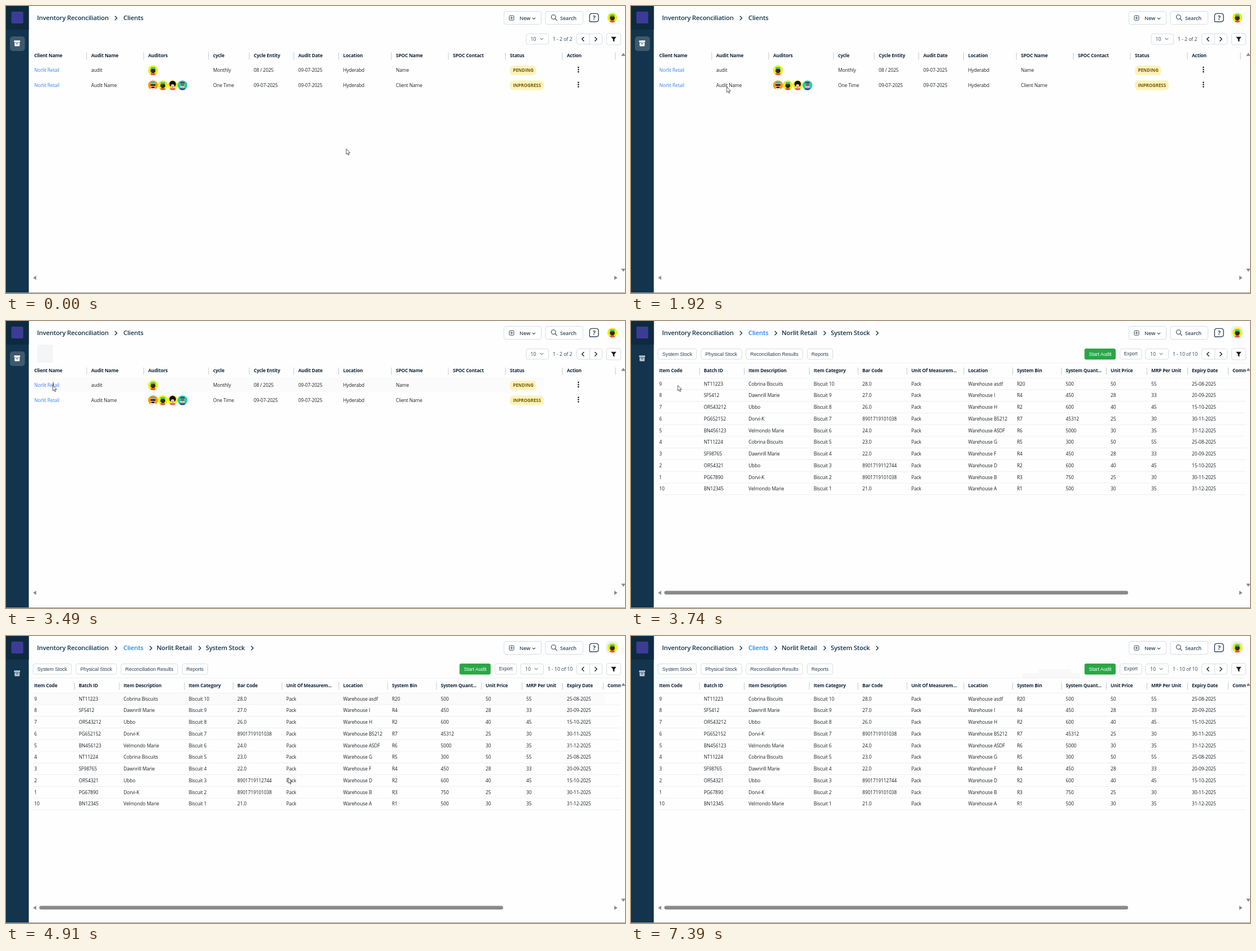
Animation of 1097x510 px, one loop 7570 ms. Source, as an HTML page:

```html
<!DOCTYPE html>
<html lang="en">
<head>
<meta charset="utf-8">
<title>Inventory Reconciliation</title>
<style>
  html, body { margin: 0; width: 100%; height: 100%; overflow: hidden; background: #fefefe; }
  svg { display: block; width: 100vw; height: 100vh; }
  text { font: 400 8.4px "Open Sans", "Noto Sans", sans-serif; letter-spacing: -.1px; fill: #1d2126; white-space: pre; }
  .head { font-weight: 700; font-size: 8.4px; letter-spacing: -.17px; fill: #12263a; }
  .crumb { font-weight: 600; font-size: 11.2px; letter-spacing: -.17px; fill: #12344d; }
  .tool { font-weight: 600; font-size: 9.1px; letter-spacing: -.12px; fill: #33475b; }
  .page { font-size: 8.8px; fill: #33475b; }
  .badge { font-weight: 700; font-size: 7.9px; letter-spacing: 0; fill: #735a0c; }
  .btn { font: 400 8.66px "Liberation Sans", Arial, sans-serif; letter-spacing: 0; fill: #2b3f52; }
  .blue { fill: #2186eb; }
  .link { fill: #3b82f6; }
</style>
</head>
<body>
<svg id="stage" viewBox="0 0 1097 510" xmlns="http://www.w3.org/2000/svg"></svg>
<script>
const LOOP = 7570;
const PARTNER = 'Norlit Retail';

const text = (x, y, s, cls = '', extra = '') => `<text x="${x}" y="${y}" class="${cls}" ${extra}>${s}</text>`;
const rect = (x, y, w, h, fill, r = 0, extra = '') =>
  `<rect x="${x}" y="${y}" width="${w}" height="${h}" rx="${r}" fill="${fill}" ${extra}/>`;
const path = (d, stroke, width = 1, fill = 'none') =>
  `<path d="${d}" fill="${fill}" stroke="${stroke}" stroke-width="${width}" stroke-linecap="round" stroke-linejoin="round"/>`;
const dot = (x, y, r, fill) => `<circle cx="${x}" cy="${y}" r="${r}" fill="${fill}"/>`;
const box = (x1, x2, y1 = 49.5, y2 = 68) => rect(x1, y1, x2 - x1, y2 - y1, '#fff', 3, 'stroke="#d3dae0" stroke-width=".9"');
const right = (x, y, s = 2.4, c = '#12344d', w = 1.4) => path(`M${x - s / 2} ${y - s * 1.4}l${s * 1.4} ${s * 1.4}l${-s * 1.4} ${s * 1.4}`, c, w);
const down = (x, y, s = 2.6, c = '#33475b', w = 1) => path(`M${x - s} ${y - s / 2}l${s} ${s}l${s} ${-s}`, c, w);
const separators = xs => path(xs.map(x => `M${x} 83v12`).join(''), '#c3c9d1', 1);

function avatar(x, y, kind) {
  const bg = { lime: '#e3f300', orange: '#ff980f', yellow: '#fff000', teal: '#1fd0b2' }[kind];
  const parts = {
    lime: rect(-4.4, 5, 8.8, 4, '#e8543f', 2) + dot(0, .6, 4.4, '#432519') +
      rect(-4, -5.6, 8, 3.4, '#38b9ad', 1.7) + rect(-1.8, 2.4, 3.6, .9, '#21110c', .4),
    orange: rect(-5, 5, 10, 4, '#eee', 2) + rect(-3.8, -4.5, 7.6, 10, '#e9c59c', 3.5) +
      rect(-4, -6.3, 8, 3.4, '#44b5a6', 1.5) + rect(-4.4, -2, 8.8, 2.8, '#171717', 1.2) +
      rect(-3, 2.4, 6, 2.6, '#302018', 1.2),
    yellow: rect(-4.8, 5, 9.6, 4, '#ee526d', 2) + dot(0, -2.3, 5.8, '#120d0b') +
      rect(-3, -1.8, 6, 7.2, '#f5caa4', 2.8) + rect(-1.5, 2.7, 3, .8, '#c43d3d', .4),
    teal: rect(-5, 5, 10, 4, '#37517b', 2) + rect(-3.7, -4, 7.4, 9, '#f4d3b5', 3.3) +
      rect(-4.2, -6.2, 8.4, 3.7, '#4b505a', 1.8) + rect(-3.5, -1.5, 7, 2.1, '#273645', .9) +
      rect(-1.6, 2.7, 3.2, .8, '#b45a48', .4)
  };
  return `<g transform="translate(${x} ${y})">${dot(0, 0, 8.7, bg)}<g clip-path="url(#face)">${parts[kind]}</g></g>`;
}

function frame() {
  const arrow = (x, y, d) => path(`M${x} ${y}${d}z`, 'none', 0, '#8a8a8a');
  return rect(0, 0, 40.4, 510, '#12344d') + rect(0, 0, 40.4, 42, '#0e2a3e') +
    rect(9.5, 10, 21, 21, '#3c3c98', 2) +
    text(55, 25, 'Inventory Reconciliation', 'crumb') + right(194.5, 21.5) +
    box(882.5, 948.5, 9.5, 32.5) + rect(892, 17.2, 8, 8, 'none', 1.2, 'stroke="#33475b"') +
    path('M894 21.2h4M896 19.2v4', '#33475b', 1) +
    text(910, 24.6, 'New', 'tool') + down(935.5, 22.2, 2.3, '#33475b', 1.1) +
    box(956, 1022.5, 9.5, 32.5) +
    '<circle cx="970.3" cy="19.6" r="3.9" fill="none" stroke="#33475b" stroke-width="1.1"/>' +
    path('M973.3 22.6l3 3.2', '#33475b', 1.1) + text(982, 24.6, 'Search', 'tool') +
    path('M1038.5 13.4h7.3q4.2 0 4.2 4.2v6.2q0 4.2-4.2 4.2h-10.5q-1 0-1-1v-9.4q0-4.2 4.2-4.2z', '#33475b', 1.4) +
    text(1042.2, 24.7, '?', 'tool', 'text-anchor="middle" style="font-size:11px;font-weight:700"') +
    box(1011.5, 1056.5) + path('M1034.5 49.5v18.5', '#d3dae0', .9) +
    path('M1024 55.4l-3.3 3.4l3.3 3.4', '#12263a', 1.4) + right(1045, 58.8, 2.4, '#12263a') +
    box(1064.5, 1089.5, 48.5, 69) +
    path('M1073 55.2h8l-3.1 3.8v4l-1.8-1.2v-2.8z', '#111', .8, '#111') +
    arrow(48, 483, 'l5.5-3.8v7.6') + arrow(1083.5, 483, 'l-5.5-3.8v7.6') +
    arrow(1094, 83.3, 'l3.8 5.4h-7.6') + arrow(1094, 472.2, 'l3.8-5.4h-7.6') +
    rect(0, 509, 1097, 1, '#8997a1');
}

const archive = c => rect(14.3, 61.2, 10.8, 3.2, c, .7) +
  path('M15.2 65.3h9v5.2q0 1-1 1h-7q-1 0-1-1z', 'none', 0, c) + rect(18, 66.6, 3.4, 1.2, '#2b485d', .5);

function clientsPage() {
  const cols = [50, 151, 252, 367, 439, 518, 597.5, 691, 792, 893, 994];
  const heads = 'Client Name|Audit Name|Auditors|cycle|Cycle Entity|Audit Date|Location|SPOC Name|SPOC Contact|Status|Action'.split('|');
  const rows = [
    'audit||Monthly|08 / 2025|09-07-2025|Hyderabd|Name',
    'Audit Name||One Time|09-07-2025|09-07-2025|Hyderabd|Client Name'
  ];
  const badge = (y, w, s) => rect(893, y - 8.3, w, 17, '#fdf3ba', 6) + text(898.5, y + 3.1, s, 'badge');
  return rect(7, 54, 26.5, 26, '#3e5a6e', 5) + archive('#fff') +
    text(208, 25, 'Clients', 'crumb') + box(922, 961.5) + text(929.5, 61.8, '10', 'page') + down(949.3, 58.6) +
    text(969, 62.4, '1 - 2 of 2', 'page') +
    heads.map((h, i) => text(cols[i], 91, h, 'head')).join('') +
    separators([...cols.slice(1).map(x => x - 8), 1080]) +
    rows.map((row, r) => {
      const y = 114.3 + r * 26.6;
      return text(50, y + 3, PARTNER, 'link') +
        row.split('|').map((s, i) => s && text(cols[i + 1], y + 3, s)).join('') +
        [-5.2, -1.3, 2.6].map(d => dot(1014.4, y + d, 1.3, '#16191d')).join('');
    }).join('') +
    avatar(260.5, 114.3, 'lime') +
    ['orange', 'lime', 'yellow', 'teal'].map((k, i) => avatar(260.5 + i * 17.4, 140.9, k)).join('') +
    badge(114.3, 46.5, 'PENDING') + badge(140.9, 60, 'INPROGRESS');
}

function stockPage() {
  const crumbs = text(208, 25, 'Clients', 'crumb blue') + right(256.3, 21.5) + text(267, 25, PARTNER, 'crumb') +
    right(343, 21.5) + text(354, 25, 'System Stock', 'crumb') + right(436, 21.5);
  const tabs = [[48, 116, 'System Stock'], [124, 196, 'Physical Stock'], [204, 304, 'Reconciliation Results'], [312.5, 357.5, 'Reports']]
    .map(([a, b, s]) => box(a, b) + text((a + b) / 2, 61.6, s, 'btn', 'text-anchor="middle"')).join('');
  return archive('#b8c4cd') + crumbs + tabs +
    rect(803.7, 48.9, 55.2, 19.5, '#28a745', 3) + text(831.5, 61.6, 'Start Audit', 'btn', 'text-anchor="middle" style="fill:#fff"') +
    box(866.5, 905) + text(885.7, 61.4, 'Export', 'btn', 'text-anchor="middle" style="font-size:8.2px"') +
    box(912, 952.5) + text(920, 61.8, '10', 'page') + down(939.5, 58.6) +
    text(960, 62.4, '1 - 10 of 10', 'page') +
    rect(1063, 9, 23, 23, '#eff1f4', 8);
}

function stockTable() {
  const cols = [50, 129, 208.3, 323.7, 410, 496.7, 597.5, 684, 770.5, 850, 922, 994, 1066];
  const heads = 'Item Code|Batch ID|Item Description|Item Category|Bar Code|Unit Of Measurem...|Location|System Bin|System Quant...|Unit Price|MRP Per Unit|Expiry Date|Comm'.split('|');
  // Each product: name, unit price, MRP, expiry
  const goods = ['Cobrina Biscuits|50|55|25-08-2025', 'Dawnrill Marie|28|33|20-09-2025', 'Ubbo|40|45|15-10-2025',
    'Dorvi-K|25|30|30-11-2025', 'Velmondo Marie|30|35|31-12-2025'];
  // Each row: item code, batch, bar code, warehouse, bin, quantity
  const rows = ['9|NT11223|28.0|asdf|R20|500', '8|SF5412|27.0|I|R4|450', '7|OR543212|26.0|H|R2|600',
    '6|PG652152|8901719101038|B5212|R7|45312', '5|BN456123|24.0|ASDF|R6|5000', '4|NT11224|23.0|G|R5|300',
    '3|SF98765|22.0|F|R4|450', '2|OR54321|8901719112744|D|R2|600', '1|PG67890|8901719101038|B|R3|750', '10|BN12345|21.0|A|R1|500'];
  return rect(40, 74, 1050, .8, '#eceef0') + rect(48, 101, 1042, .8, '#eceef0') +
    `<g clip-path="url(#view)">${heads.map((h, i) => text(cols[i], 91, h, 'head')).join('')}</g>` +
    separators(cols.slice(1).map(x => x - 7.6)) +
    rows.map((row, r) => {
      const y = 111.5 + r * 20.76;
      const [code, batch, bar, house, bin, qty] = row.split('|');
      const [name, price, mrp, expiry] = goods[r % 5].split('|');
      const cells = [code, batch, name, 'Biscuit ' + (10 - r), bar, 'Pack', 'Warehouse ' + house, bin, qty, price, mrp, expiry];
      return cells.map((s, i) => text(cols[i], y + 3, s)).join('') + rect(48, y + 10, 1042, .8, '#e9ebed');
    }).join('') +
    rect(59, 479.4, 822, 6.6, '#8a8a8a', 3.3);
}

const group = (id, body) => `<g id="${id}">${body}</g>`;
document.getElementById('stage').innerHTML =
  '<defs><clipPath id="face"><circle r="8.7"/></clipPath><clipPath id="view"><rect x="40" y="74" width="1049.5" height="30"/></clipPath>' +
  '<linearGradient id="glow"><stop stop-color="#173f6b" stop-opacity="0"/><stop offset="1" stop-color="#173f6b" stop-opacity=".35"/></linearGradient></defs>' +
  rect(0, 0, 1097, 510, '#fefefe') +
  group('shadeA', rect(48, 101, 905, 26, '#fbfbfc')) +
  group('shadeB', rect(48, 102, 1014, 19.5, '#fbfbfc')) +
  group('trailA', rect(757, 66, 38, 9, '#f9f9fa')) +
  group('trailB', rect(722, 59, 58, 16, '#f8f8f9') + rect(694, 66, 101, 9, '#f8f8f9')) +
  frame() +
  group('clients', clientsPage()) + group('stock', stockPage()) + group('table', stockTable()) +
  avatar(1074.5, 20.7, 'lime') +
  group('press', rect(55, 42, 28.5, 32, '#f4f5f7')) +
  group('bar', '<rect id="fill" x="40" y="0" height="2" fill="#173f6b"/>' +
    group('peg', path('M-72 1H0V3.6z', 'none', 0, 'url(#glow)'))) +
  group('caretTop', rect(55, 12, 1, 16, '#111')) +
  group('caretRow', rect(83, 108.5, .9, 7, '#333')) +
  group('cursor', path('M0 .3v9.2l2.1-1.9l1.6 3.4l1.5-.7l-1.6-3.3h2.9z', '#2b2f3a', .8, '#fff'));

const part = {};
for (const id of ['shadeA', 'shadeB', 'trailA', 'trailB', 'clients', 'stock', 'table', 'press', 'bar', 'fill', 'peg', 'caretTop', 'caretRow', 'cursor'])
  part[id] = document.getElementById(id);
const show = (id, on) => part[id].setAttribute('display', on ? 'inline' : 'none');

// Pointer stops: time, x, y
const stops = [
  [1290, 603, 254], [1420, 540, 238], [1600, 370, 193], [1760, 235, 159], [1920, 170, 144], [2000, 151, 137],
  [2060, 151, 137], [2300, 122, 127], [2600, 92, 117], [2810, 83, 114.5],
  [4230, 83, 114.5], [4370, 123, 130], [4550, 260, 190], [4750, 440, 241], [4910, 500, 252],
  [5310, 500, 252], [5450, 690, 282], [5600, 900, 215], [5720, 870, 125], [5840, 757, 59],
  [5950, 694, 66], [6060, 610, 150], [6230, 430, 320], [6400, 250, 512]
];
function pointer(t) {
  const i = stops.findIndex(s => s[0] > t);
  if (i < 0) return stops[stops.length - 1].slice(1);
  if (i === 0) return stops[0].slice(1);
  const [a, b] = [stops[i - 1], stops[i]];
  const k = (t - a[0]) / (b[0] - a[0]);
  return [a[1] + (b[1] - a[1]) * k, a[2] + (b[2] - a[2]) * k];
}

const within = (t, a, b) => t >= a && t < b;
const blinks = [[3080, 3110], [4100, 4600], [5090, 5600], [6060, 6550], [7030, 7390]];

function draw(t) {
  const second = t >= 3520;
  show('clients', !second);
  show('stock', second);
  show('table', t >= 3610);
  show('shadeA', within(t, 2400, 3520));
  show('shadeB', within(t, 4260, 5400));
  show('trailA', within(t, 5800, 5950));
  show('trailB', t >= 5950);
  show('press', within(t, 3490, 3520));
  show('caretTop', blinks.some(([a, b]) => within(t, a, b)));
  show('caretRow', within(t, 3110, 3520));
  show('bar', within(t, 4260, 4700));
  const loaded = Math.max(0, Math.min(1057, 700 + (t - 4260) * 2.89));
  part.fill.setAttribute('width', loaded);
  part.peg.setAttribute('transform', `translate(${40 + loaded} 0)`);
  part.bar.setAttribute('opacity', Math.max(0, Math.min(1, (4700 - t) / 200)));
  const [x, y] = pointer(t);
  part.cursor.setAttribute('transform', `translate(${x} ${y})`);
  show('cursor', t < 6400);
}

const start = performance.now();
function tick() {
  draw((performance.now() - start) % LOOP);
  requestAnimationFrame(tick);
}
tick();
</script>
</body>
</html>
```
